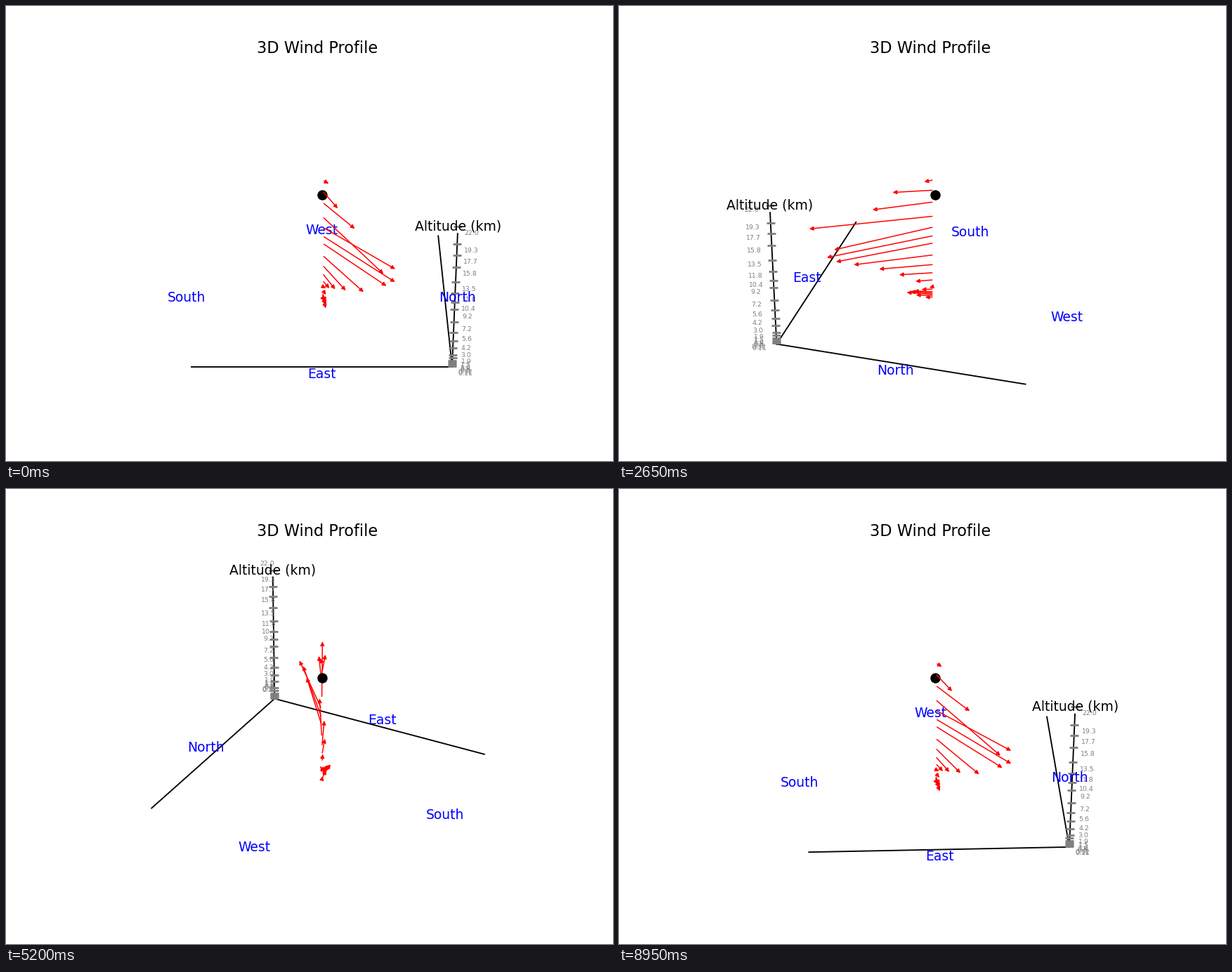
These frames come from a looping animation (864 by 648 pixels, 9 s). A matplotlib script:

```python
import numpy as np
import matplotlib.pyplot as plt
from matplotlib.animation import FuncAnimation
from matplotlib.patches import FancyArrowPatch, Rectangle

plt.rcParams["font.family"] = "DejaVu Sans"

W, H, DPI = 864, 648, 135
FRAMES, INTERVAL = 180, 50

# Perspective camera: orbiting at a fixed elevation and distance
ELEV = np.radians(30)
DIST = 10.0
SCALE = 2697.0
CX, CY = 449.54, 321.1

# Scene dimensions in world units
HALF = 0.6623
OUTER = 1.1 * HALF
FLOOR = -0.4114
Z_MAX = 22.0
MARKER_Z = 16.95


def height(km):
    return FLOOR * (1 - 2 * km / Z_MAX)


def altitude(hpa):
    """Standard-atmosphere altitude in km of a pressure level."""
    return 44.31 * (1 - (hpa / 1013.25) ** 0.19026)


def wind(km):
    """East and north components: a low-level jet and a high one."""
    east = np.interp(
        km,
        [0.1, 0.54, 1.95, 7.2, 10.4, 11.8, 13.5, 15.8, 17.7, 19.3],
        [0.06, 0.165, 0.035, 0.395, 0.487, 0.444, 0.602, 0.298, 0.215, 0.058])
    north = 0.02 + 0.37 * np.exp(-((km - 11.1) / 3.6) ** 2 / 2)
    return east, north


def project(point, azim):
    """Return screen x, screen y and nearness of a world point."""
    x, y, z = point
    c, s = np.cos(azim), np.sin(azim)
    right, front = y * c - x * s, x * c + y * s
    near = front * np.cos(ELEV) + z * np.sin(ELEV)
    up = z * np.cos(ELEV) - front * np.sin(ELEV)
    k = SCALE / (DIST - near)
    return CX + k * right, CY - k * up, near


pressures = np.r_[1000:875:-25, 850, 800, 700:200:-100, 250:50:-50, 70, 50]
levels = altitude(pressures)
ticks = np.append(levels, Z_MAX)

fig = plt.figure(figsize=(W / DPI, H / DPI), dpi=DPI, facecolor="white")
ax = fig.add_axes([0, 0, 1, 1])
ax.set_xlim(0, W)
ax.set_ylim(H, 0)
ax.axis("off")
ax.text(442.8, 67.2, "3D Wind Profile", fontsize=12, ha="center",
        va="baseline")

# Lines are cut off at the plot area, text and ticks are not
area = Rectangle((193.32, 77.76), 498.96, 498.96, transform=ax.transData)

corner = (HALF, HALF, FLOOR)
edges = []
for end in [(HALF, -HALF, FLOOR), (-HALF, HALF, FLOOR),
            (HALF, HALF, height(0.95 * Z_MAX))]:
    line, = ax.plot([], [], color="black", lw=1)
    line.set_clip_path(area)
    edges.append((line, end))

tick_marks, = ax.plot([], [], "_", color="gray", ms=6, mew=1.5,
                      clip_on=False)

labels = []


def add_text(point, string, shift=0, **style):
    text = ax.text(0, 0, string, ha="center", va="center", **style)
    labels.append((text, point, shift))


for km in ticks:
    name = f"{km:.2f}" if km < 0.5 else f"{km:.1f}"
    add_text((OUTER, OUTER, height(km)), name, shift=-1.5, fontsize=5,
             color="gray")
for name, x, y in [("East", OUTER, 0), ("West", -OUTER, 0),
                   ("North", 0, OUTER), ("South", 0, -OUTER)]:
    add_text((x, y, FLOOR), name, fontsize=10, color="blue")
add_text((HALF, HALF, height(Z_MAX)), "Altitude (km)", fontsize=10)

arrows = []
for km in levels:
    arrow = FancyArrowPatch((0, 0), (1, 1), arrowstyle="-|>",
                            mutation_scale=6, lw=0.8, color="red")
    ax.add_patch(arrow)
    z = height(km)
    arrows.append((arrow, (0, 0, z), (*wind(km), z)))

dot_x, dot_y, dot_near = project((0, 0, height(MARKER_Z)), 0)
ax.plot([dot_x], [dot_y], "o", color="black", ms=7.7, mew=0,
        zorder=5 + dot_near)


def update(frame):
    azim = 2 * np.pi * frame / FRAMES
    x0, y0, _ = project(corner, azim)
    for line, end in edges:
        x1, y1, _ = project(end, azim)
        line.set_data([x0, x1], [y0, y1])
    tick_marks.set_data(*project((HALF, HALF, height(ticks)), azim)[:2])
    for text, point, shift in labels:
        x, y, _ = project(point, azim)
        text.set_position((x + shift, y))
    for arrow, base, tip in arrows:
        xa, ya, na = project(base, azim)
        xb, yb, nb = project(tip, azim)
        arrow.set_positions((xa, ya), (xb, yb))
        arrow.set_zorder(5 + max(na, nb))
    return []


anim = FuncAnimation(fig, update, frames=FRAMES, interval=INTERVAL,
                     init_func=lambda: [], repeat=True, repeat_delay=0,
                     blit=False)
plt.show()
```
